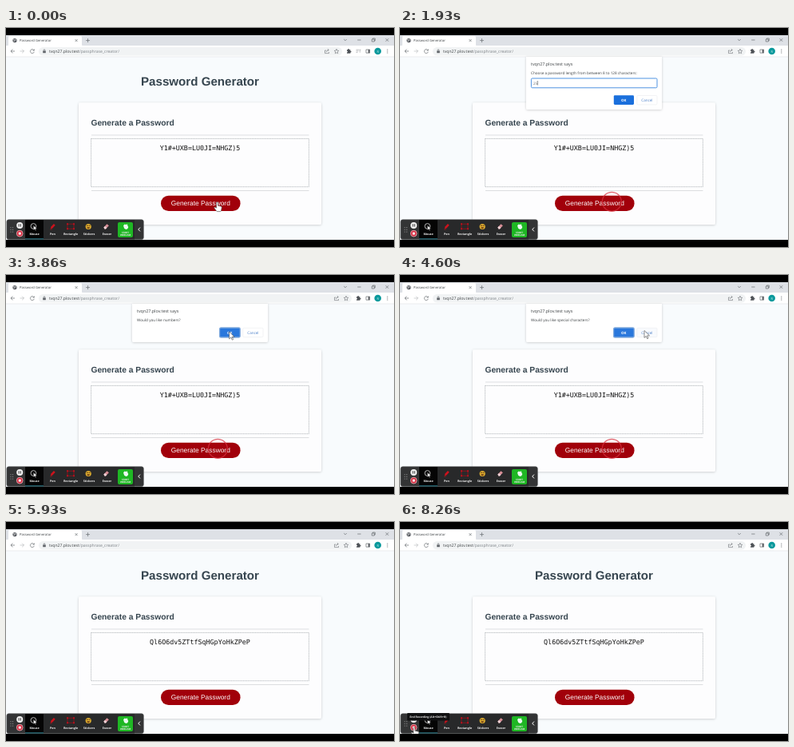
Recreate the animation shown at these times as an HTML page. Size 486 by 274 pixels, loop 8330 ms.

```html
<!DOCTYPE html>
<html lang="en">
<head>
<meta charset="utf-8">
<title>Password Generator</title>
<style>
html, body { margin: 0; width: 100%; height: 100%; overflow: hidden; background: #000; }
svg { display: block; width: 486px; height: 274px; }
text { font-family: "Open Sans", "Noto Sans", sans-serif; fill: #3c4043; text-rendering: geometricPrecision; }
.page text { font-family: "Liberation Sans", Arial, sans-serif; fill: #36454f; }
.page .mono { font: 8.37px "DejaVu Sans Mono", monospace; fill: #111; }
.page .label { fill: #fff; }
.bold { font-weight: 700; }
.mid { text-anchor: middle; }
.line { fill: none; stroke: #5f6368; stroke-width: .65; }
.tools text { font-size: 3.7px; font-weight: 700; fill: #eee; text-anchor: middle; }
</style>
</head>
<body>
<svg viewBox="0 0 486 274">
  <defs>
    <filter id="shadow" x="-10%" y="-10%" width="120%" height="130%">
      <feDropShadow dx="0" dy=".6" stdDeviation="1.4" flood-opacity=".2"/>
    </filter>
    <clipPath id="screen"><rect y="9" width="486" height="256"/></clipPath>
  </defs>
  <rect width="486" height="274"/>

  <g class="page">
    <rect y="36" width="486" height="229" fill="#f8fbfd"/>
    <text class="bold mid" x="243" y="71.8" font-size="15.13">Password Generator</text>
    <rect x="91" y="93.5" width="304" height="152.5" rx="2" fill="#fdfdfe" filter="url(#shadow)"/>
    <text class="bold" x="106.4" y="122.4" font-size="10.27">Generate a Password</text>
    <path d="M107 134H379.5M107 203.5H379.5" stroke="#cfd2d4" stroke-width=".7"/>
    <rect x="106.6" y="138.5" width="272.8" height="60.2" fill="#fdfdfe" stroke="#7d858b" stroke-width=".5" stroke-dasharray="1.2 .7"/>
    <text class="mono mid" id="password" x="243" y="152.8"></text>
    <rect x="194" y="209.8" width="99.6" height="19.2" rx="9.6" fill="#a1000a"/>
    <text class="label mid" x="243.8" y="222.2" font-size="8.38">Generate Password</text>
  </g>
  <circle id="ring" cx="265.3" cy="217.3" fill="#d8323f" fill-opacity=".06" stroke="#d8323f" stroke-opacity=".75" stroke-width="1.3"/>

  <!-- browser frame -->
  <rect y="9" width="486" height="14" fill="#dee1e6"/>
  <path d="M1 23q2 0 2-2v-9q0-2 2-2h88q2 0 2 2v9q0 2 2 2z" fill="#fff"/>
  <rect y="22" width="486" height="14" fill="#fff"/>
  <path d="M0 36H486" stroke="#dfe1e5" stroke-width=".6"/>
  <circle cx="11" cy="15.6" r="2.6" fill="#55595e"/>
  <path d="M9 14.5l2 .5-.5 1.5-1 .3M12 13.5l-.3 1.2 1.5.8" fill="none" stroke="#fff" stroke-width=".6"/>
  <text x="17" y="17.2" font-size="4.2">Password Generator</text>
  <path class="line" d="M86.6 14.1l3 3m0-3l-3 3M100 15.6h5m-2.5-2.5v5M423.2 14l1.8 1.8 1.8-1.8M440.2 15h4.4M458.3 14h3v3h-3zM459.3 14v-1h3v3h-1M475.6 13.2l3.6 3.6m0-3.6l-3.6 3.6"/>
  <path class="line" d="M11 29H6m2.4-2.4L6 29l2.4 2.4M35 27.8a2.5 2.5 0 1 0 .3 2M35.3 26.4v1.8h-1.8"/>
  <path class="line" d="M17.5 29h5m-2.4-2.4l2.4 2.4-2.4 2.4" opacity=".45"/>
  <rect id="omnibox" x="41" y="24" height="10.4" rx="5.2" fill="#f1f3f4"/>
  <rect x="46.2" y="28.4" width="3.6" height="2.9" rx=".4" fill="#5f6368"/>
  <path class="line" d="M47 28.5v-1q1-1.5 2 0v1"/>
  <text x="54" y="30.9" font-size="5.1">tvqn27.plov.test<tspan fill="#7b8086">/passphrase_creator/</tspan></text>
  <g id="actions">
    <path class="line" d="M401 28h-1.5v3.6h5V30M401.3 30q.2-2.5 2.8-2.5m-1.2-1.3l1.4 1.3-1.4 1.3" opacity=".85"/>
    <path class="line" d="M414 26.3l.8 1.9 2 .2-1.5 1.4.4 2-1.7-1-1.7 1 .4-2-1.5-1.4 2-.2z" opacity=".85"/>
    <path d="M427 27.3h1.2q0-1.2.9-1.2t.9 1.2h1.4v1.4q1.2 0 1.2.9t-1.2.9v1.3H427v-1.3q1 0 1-.9t-1-.9z" fill="#4d5156"/>
  </g>
  <path id="media" class="line" d="M438.5 27.2h4m-4 1.7h3m-3 1.7h2M443.3 27.2v3.5m0-3.5h1.2" opacity=".6"/>
  <path class="line" d="M451 27h4.6v4.2H451z"/>
  <path d="M453.6 27h2v4.2h-2z" fill="#5f6368"/>
  <circle cx="465.7" cy="29" r="4.3" fill="#0a999c"/>
  <text class="mid" x="465.7" y="30.5" font-size="4" style="fill:#d5eeee">R</text>
  <g fill="#5f6368"><circle cx="477.8" cy="27" r=".6"/><circle cx="477.8" cy="29" r=".6"/><circle cx="477.8" cy="31" r=".6"/></g>

  <!-- dialog -->
  <g id="dialog">
    <path id="sheet" fill="#fff" filter="url(#shadow)"/>
    <text x="164" y="47" font-size="5.4">tvqn27.plov.test says</text>
    <text id="question" x="164" y="57.8" font-size="4.68"></text>
    <g id="field">
      <rect x="164.4" y="63" width="157.6" height="11.8" rx="1.3" fill="#fff" stroke="#4f93e2" stroke-width="1"/>
      <text id="typed" x="167" y="70.5" font-size="4.6" opacity=".8"></text>
      <path id="caret" stroke="#3c4043" stroke-width=".5"/>
    </g>
    <g id="buttons">
      <rect x="267.8" y="-5.9" width="25.2" height="11.6" rx="1.3" fill="#1a6fdc"/>
      <rect id="focus" x="267.6" y="-6" width="25.6" height="12" rx="1.6" fill="#2a78dc" stroke="#7fa9dd" stroke-width="1.3"/>
      <text class="mid bold" x="280.3" y="1.6" font-size="4.4" style="fill:#fff">OK</text>
      <rect id="cancel" x="296.8" y="-5.7" width="25.2" height="11.4" rx="1.3" stroke="#e4e7ea" stroke-width=".5"/>
      <text class="mid" x="309.4" y="1.6" font-size="4.6" style="fill:#4a7fc8">Cancel</text>
    </g>
  </g>

  <!-- recording tools -->
  <g class="tools">
    <rect x=".9" y="239.8" width="171.4" height="24.8" rx="2.5" fill="#333435" stroke="#505152" stroke-width=".6"/>
    <rect x="24" y="240.2" width="137" height="24.2" fill="#28292a"/>
    <rect x="24" y="240.2" width="23" height="24.2" fill="#050505"/>
    <rect x="24" y="263.4" width="23" height="1" fill="#2d8797"/>
    <path d="M6 249.2v6.6M8.6 249.2v6.6" stroke="#999" stroke-width="1" stroke-dasharray="1 1.7"/>
    <circle cx="17.2" cy="246.9" r="4" fill="#f2f2f2"/>
    <path d="M16.1 245.2v3.4m2.2-3.4v3.4" stroke="#222" stroke-width=".9"/>
    <circle cx="17.2" cy="257.1" r="3.9" fill="#d3253a" stroke="#eeb4bb" stroke-width=".8"/>
    <rect x="15.7" y="255.6" width="3" height="3" fill="#fff"/>
    <circle cx="34.4" cy="248" r="3.4" fill="none" stroke="#ddd" stroke-width=".8"/>
    <path d="M34.4 247v6l1.5-1.4 1 2 .9-.4-1-2h2z" fill="#fff" stroke="#000" stroke-width=".4"/>
    <path d="M55.7 251.2l.8-2.6 3.4-3.5 1.8 1.7-3.4 3.6z" fill="#cf121c"/>
    <path d="M55.2 251.9h2.6" stroke="#cf121c" stroke-width=".6"/>
    <rect x="77" y="245.2" width="8" height="6" fill="none" stroke="#9c101a" stroke-width=".8"/>
    <path d="M76 244.2h2v2h-2zM84 244.2h2v2h-2zM76 250.2h2v2h-2zM84 250.2h2v2h-2z" fill="#b7101c"/>
    <circle cx="103.2" cy="248.5" r="3.6" fill="#e0b030"/>
    <path d="M101.2 249.2h4q-.5 2-2 2t-2-2z" fill="#6d3b16"/>
    <path d="M100.8 247.3h2m.8 0h2" stroke="#5a3512" stroke-width="1.1"/>
    <path d="M122.4 249.4l4-4.1 2.5 2-4 4.1h-1.4z" fill="#d98f97"/>
    <path d="M122.4 249.4l1.5-1.5 2.5 2-1.5 1.5h-1.4z" fill="#ecd5d8"/>
    <rect x="140" y="243" width="19" height="19" rx="2" fill="#1fb724"/>
    <path d="M147 247.2l1.6-1.8 1.4.7 2-.6.4 2 .9 1.6-1 2.2-2 .6-2.2-1.2z" fill="#eefaf4"/>
    <text x="35.5" y="258.6">Mouse</text>
    <text x="58.4" y="258.6">Pen</text>
    <text x="81" y="258.6">Rectangle</text>
    <text x="104" y="258.6">Stickers</text>
    <text x="126.5" y="258.6">Eraser</text>
    <text x="149.6" y="256.5" style="font-size:3px">START</text>
    <text x="149.6" y="259.7" style="font-size:3px">WEBCAM</text>
    <path d="M168 249.6l-2.3 2.4 2.3 2.4" fill="none" stroke="#fff" stroke-width="1"/>
    <g id="tip">
      <rect x="9" y="239" width="53" height="9.4" rx="1" fill="#101112"/>
      <text x="35.3" y="245" style="font-size:3.4px">End Recording (Alt+Shift+R)</text>
    </g>
  </g>

  <g clip-path="url(#screen)">
    <path id="pointer" fill="#fff" stroke="#444" stroke-width=".6" stroke-linejoin="round"/>
  </g>
</svg>
<script>
const LOOP = 8330, OPEN = 800, CLOSE = 4950;
const $ = id => document.getElementById(id);
const show = (id, on) => $(id).style.display = on ? '' : 'none';
const set = (id, attrs) => { for (const k in attrs) $(id).setAttribute(k, attrs[k]); };
const clamp = v => Math.max(0, Math.min(1, v));

const ARROW = 'M0 0v9l2.1-2 1.5 3.2 1.4-.6-1.5-3.2h3z';
const HAND = 'M-1 1q0-1.3 1-1.3t1 1.3v3.2l3.6.8q1.4.3 1.2 1.7l-.7 3.6q-.2 1.3-1.2 1.3h-3.6q-.8 0-1.3-.7l-2.8-4q.2-1.2 1.4-.6l1.4.8z';

// time, x, y of the pointer tip
const route = [
  [0, 264.5, 218], [2400, 264.5, 218], [2850, 280, 89], [3060, 280, 89],
  [3330, 279, 71], [4210, 280, 71], [4560, 306, 69.5], [5000, 306, 69.5],
  [5800, 120, 270], [6800, 14, 272], [7200, 9.5, 258.5], [7500, 17.8, 257], [LOOP, 17.8, 257]
];
const questions = [
  [OPEN, 'Choose a password length from between 8 to 128 characters:'],
  [3060, 'Would you like uppercase letters?'],
  [3500, 'Would you like lowercase letters?'],
  [3860, 'Would you like numbers?'],
  [4200, 'Would you like special characters?']
];

function pointerAt(t) {
  const i = route.findIndex(p => p[0] > t);
  const [a, b] = [route[i - 1], route[i]];
  const u = (t - a[0]) / (b[0] - a[0]), e = u * u * (3 - 2 * u);
  return [1, 2].map(k => a[k] + (b[k] - a[k]) * e);
}

function drawDialog(t) {
  const open = t >= OPEN && t < CLOSE;
  show('dialog', open);
  if (!open) return;
  const prompt = t < 3060, bottom = prompt ? 102 : 84;
  $('question').textContent = questions.filter(q => q[0] <= t).pop()[1];
  set('sheet', { d: `M158 36H328V${bottom - 2}q0 2-2 2H160q-2 0-2-2z` });
  set('buttons', { transform: `translate(0 ${prompt ? 90.2 : 72})` });
  show('field', prompt);
  show('focus', !prompt);
  set('cancel', { fill: t > 4480 ? '#f8fafd' : '#fff' });

  const typed = '25'.slice(0, (t >= 1730) + (t >= 1930));
  const since = t < 1730 ? t - OPEN : t - 1930;
  $('typed').textContent = typed;
  set('caret', { d: `M${167.3 + typed.length * 2.63} 66v5.6` });
  show('caret', since < 0 || since % 1060 < 530);
}

function draw(t) {
  const media = t < OPEN;
  show('media', media);
  set('omnibox', { width: media ? 380 : 392 });
  set('actions', { transform: `translate(${media ? 0 : 12} 0)` });
  $('password').textContent = t < CLOSE ? 'Y1#+UXB=LU0JI=NHGZ)5' : 'Ql6O6dv5ZTtfSqHGpYoHkZPeP';

  // the click ring waits while the dialogs block the page
  const grow = clamp((t - 650) / 150), fade = clamp((t - CLOSE) / 150);
  set('ring', { r: 12 * grow + 3 * fade, opacity: grow > 0 ? 1 - fade : 0 });

  drawDialog(t);
  show('tip', t >= 8200);

  const [x, y] = pointerAt(t);
  show('pointer', !(t >= 1730 && t < 2400 || t >= 5800 && t < 6800));
  set('pointer', { d: t < OPEN || t > 7420 ? HAND : ARROW, transform: `translate(${x} ${y})` });
}

const start = performance.now();
function tick() {
  draw((performance.now() - start) % LOOP);
  requestAnimationFrame(tick);
}
tick();
</script>
</body>
</html>
```
